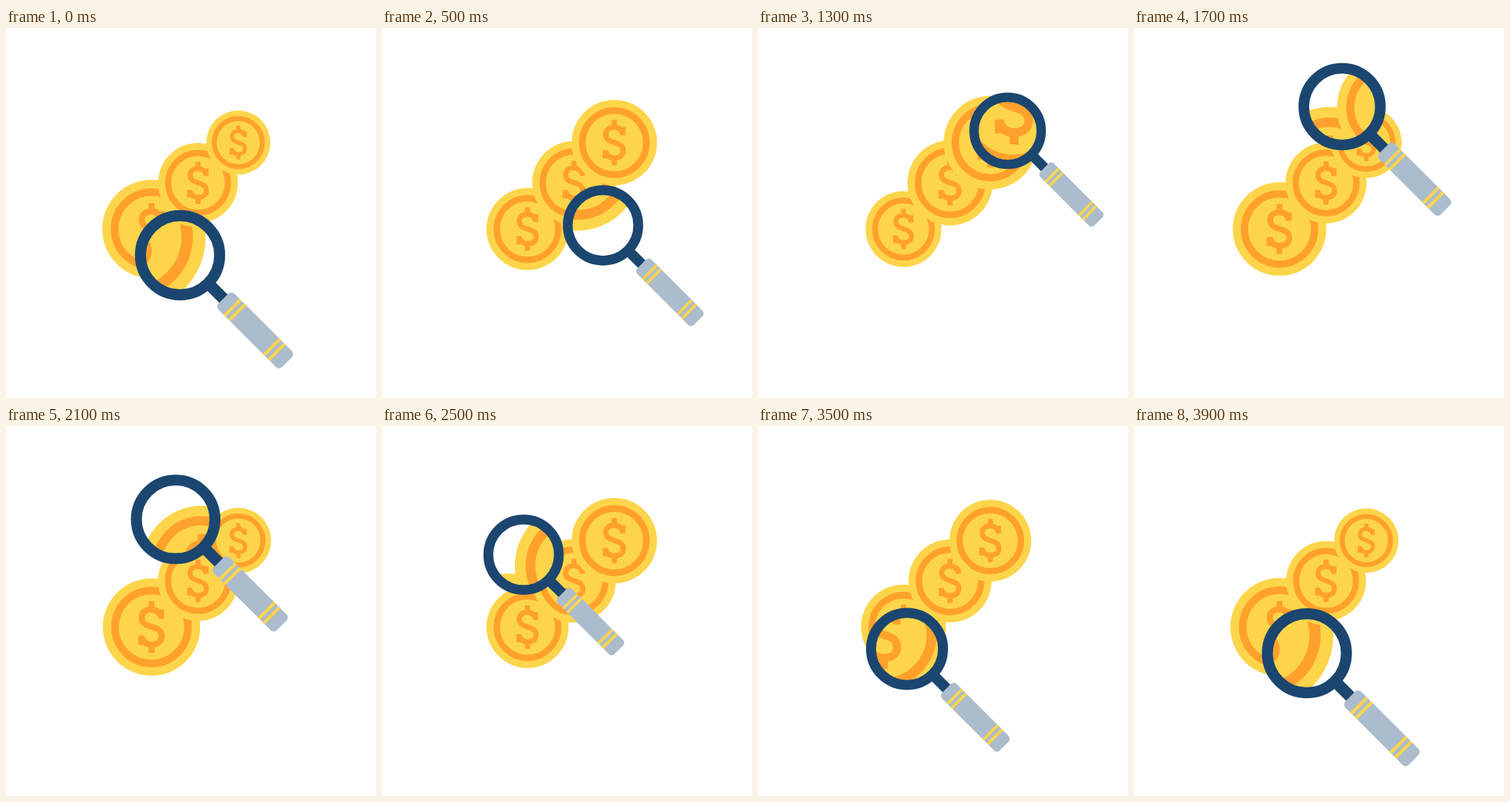
Write an HTML page with a canvas that moves like this. It is 473 px wide and 473 px high and loops after 4 s.

```html
<!DOCTYPE html>
<html lang="en">
<head>
<meta charset="utf-8">
<title>Coins under a magnifier</title>
<style>
  html, body { margin: 0; width: 100%; height: 100%; overflow: hidden; background: #fefefe; }
  canvas { display: block; }
</style>
</head>
<body>
<canvas id="stage" width="473" height="473"></canvas>
<script>
const ctx = document.getElementById('stage').getContext('2d');
const LOOP = 4000, STEP = 100, SIZE = 473, ZOOM = 1.5;
const WHITE = '#fefefe', YELLOW = '#fdd54b', ORANGE = '#ffa12c', NAVY = '#1b466f', STEEL = '#abbccc';

// x, y, mean radius, pulse
const coins = [
  [186, 257, 53.4, 9.6],
  [245.5, 198, 53.3, -2.3],
  [297, 146.5, 53.4, -12.5],
];

// Lens path: time, x, y
const path = [
  [0, 222.5, 290.5], [600, 296, 238], [900, 332.5, 182.5], [1200, 327, 143],
  [1700, 266, 100.5], [1800, 252.5, 101.3], [2500, 181, 164.5], [2900, 158.5, 217.5],
  [3000, 157.5, 231], [3500, 190.5, 285], [3900, 221, 290.5],
];

const dollar = new Path2D(
  'M.2 -.36V-.17 M.2 -.19C.17 -.31 .1 -.36 0 -.36C-.13 -.36 -.2 -.29 -.2 -.19' +
  'C-.2 -.06 -.08 -.03 .01 0C.12 .03 .21 .07 .21 .19C.21 .3 .12 .36 0 .36' +
  'C-.11 .36 -.18 .3 -.21 .19 M-.21 .17V.37 M0 -.53V-.36 M0 .36V.53');

function key(i) {
  const n = path.length, lap = Math.floor(i / n);
  const [t, x, y] = path[i - lap * n];
  return [t + lap * LOOP, x, y];
}

function slope(i, axis) {
  const a = key(i - 1), b = key(i), c = key(i + 1);
  const h0 = b[0] - a[0], h1 = c[0] - b[0];
  return ((c[axis] - b[axis]) / h1 * h0 + (b[axis] - a[axis]) / h0 * h1) / (h0 + h1);
}

function lensAt(t, axis) {
  let i = 0;
  while (key(i + 1)[0] <= t) i++;
  const a = key(i), b = key(i + 1), h = b[0] - a[0], u = (t - a[0]) / h, v = 1 - u;
  return v * v * (1 + 2 * u) * a[axis] + u * u * (3 - 2 * u) * b[axis]
    + h * u * v * (v * slope(i, axis) - u * slope(i + 1, axis));
}

function disc(x, y, r, color) {
  ctx.beginPath();
  ctx.arc(x, y, r, 0, 2 * Math.PI);
  ctx.fillStyle = color;
  ctx.fill();
}

function ring(r, width, color) {
  ctx.beginPath();
  ctx.arc(0, 0, r, 0, 2 * Math.PI);
  ctx.lineWidth = width;
  ctx.strokeStyle = color;
  ctx.stroke();
}

function drawCoins(pulse) {
  for (const [x, y, mean, swing] of coins) {
    ctx.save();
    ctx.translate(x, y);
    ctx.scale(mean + swing * pulse, mean + swing * pulse);
    disc(0, 0, 1, YELLOW);
    ring(0.75, 0.155, ORANGE);
    ctx.lineWidth = 0.125;
    ctx.stroke(dollar);
    ctx.restore();
  }
}

function drawMagnifier(x, y, r, pulse) {
  ctx.save();
  disc(x, y, r * 0.88, WHITE);
  ctx.clip();
  ctx.translate(SIZE / 2, SIZE / 2);
  ctx.scale(ZOOM, ZOOM);
  ctx.translate(-SIZE / 2, -SIZE / 2);
  drawCoins(pulse);
  ctx.restore();

  ctx.save();
  ctx.translate(x, y);
  ctx.rotate(Math.PI / 4);
  ctx.scale(r, r);
  ring(0.878, 0.244, NAVY);
  ctx.fillStyle = NAVY;
  ctx.fillRect(0.9, -0.13, 0.6, 0.26);
  ctx.beginPath();
  ctx.roundRect(1.36, -0.25, 1.99, 0.5, 0.1);
  ctx.fillStyle = STEEL;
  ctx.fill();
  ctx.fillStyle = YELLOW;
  for (const at of [1.645, 1.79, 2.88, 3.03]) ctx.fillRect(at - 0.035, -0.25, 0.07, 0.5);
  ctx.restore();
}

function draw(t) {
  const pulse = Math.cos((t + 30) / LOOP * 4 * Math.PI);
  ctx.fillStyle = WHITE;
  ctx.fillRect(0, 0, SIZE, SIZE);
  drawCoins(pulse);
  drawMagnifier(lensAt(t, 1), lensAt(t, 2), 51.9 + 5.8 * pulse, pulse);
}

const start = performance.now();
function tick() {
  const t = (performance.now() - start) % LOOP;
  draw(Math.floor(t / STEP) * STEP);
  requestAnimationFrame(tick);
}
tick();
</script>
</body>
</html>
```
